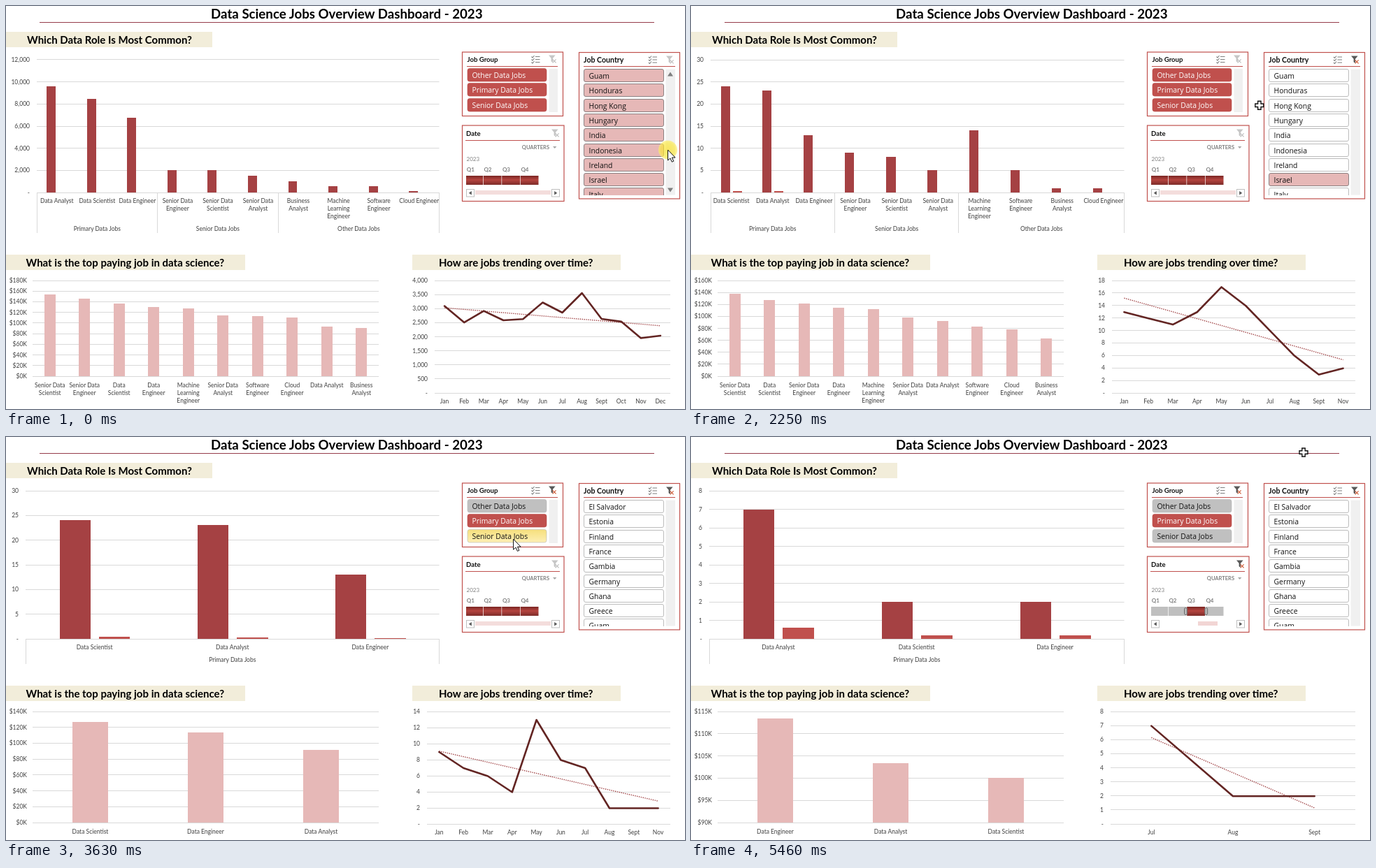
An HTML page that plays this animation: 971 by 577 pixels, repeating every 5.49 s.

```html
<!DOCTYPE html>
<html lang="en">
<head>
<meta charset="utf-8">
<title>Data Science Jobs Overview Dashboard</title>
<style>
  html, body { margin: 0; width: 100%; height: 100%; overflow: hidden; background: #fff; }
  svg { display: block; width: 971px; height: 577px; }
  text { font-family: Lato, "Open Sans", sans-serif; font-size: 8.5px; fill: #404040; }
  .title { font-size: 18.7px; font-weight: 700; fill: #000; }
  .head { font-size: 15px; font-weight: 700; fill: #000; }
  .cap { font-weight: 700; fill: #111; }
  .item { font-family: "Open Sans", "Noto Sans", sans-serif; font-size: 10.4px; }
  .soft { font-size: 8px; fill: #808080; }
  .bold { font-weight: 700; }
</style>
</head>
<body>
<svg viewBox="0 0 971 577" xmlns="http://www.w3.org/2000/svg">
  <defs>
    <linearGradient id="hover" x2="0" y2="1">
      <stop offset="0" stop-color="#f6df7c"/><stop offset="1" stop-color="#fdefb4"/>
    </linearGradient>
    <linearGradient id="seg" x2="0" y2="1">
      <stop offset="0" stop-color="#7a2623"/><stop offset=".45" stop-color="#b5443f"/><stop offset="1" stop-color="#7d2c29"/>
    </linearGradient>
    <radialGradient id="glow">
      <stop offset="0" stop-color="#fbe020"/><stop offset=".75" stop-color="#fbe83c"/><stop offset="1" stop-color="#fcee70"/>
    </radialGradient>
    <clipPath id="list"><rect x="820" y="88" width="140" height="183"/></clipPath>
  </defs>
  <rect width="971" height="577" fill="#fff"/>
  <g id="frame"></g>
  <g id="charts"></g>
  <g id="panels"></g>
  <circle id="halo" r="13.5" fill="url(#glow)"/>
  <path id="arrow" d="M0 0V15L3.4 11.9L5.8 17.2L8.2 16.2L5.9 11H10.6Z" fill="#fff" stroke="#111" stroke-width="1"/>
  <path id="cross" d="M-2.2 -6H2.2V-2.2H6V2.2H2.2V6H-2.2V2.2H-6V-2.2H-2.2Z" fill="#fff" stroke="#111" stroke-width="1.4"/>
</svg>
<script>
const LOOP = 5490;
const $ = id => document.getElementById(id);

// SVG helpers
const rect = (x, y, w, h, fill, more = '') =>
  `<rect x="${x}" y="${y}" width="${w}" height="${h}" fill="${fill}" ${more}/>`;
const text = (x, y, s, cls = '', anchor = 'start', more = '') =>
  `<text x="${x}" y="${y}" class="${cls}" text-anchor="${anchor}" ${more}>${s}</text>`;
const path = (d, stroke, w = 1, more = '') =>
  `<path d="${d}" fill="none" stroke="${stroke}" stroke-width="${w}" ${more}/>`;
const snap = v => Math.round(v) + .5;
const lines = (x, y, s) => s.split('/').map((p, i) => text(x, y + i * 11, p, '', 'middle')).join('');

// Bar on whole pixels
function bar(x, w, top, base, fill) {
  const l = Math.round(x), t = Math.round(top);
  return rect(l, t, Math.round(x + w) - l, base - t, fill);
}

// Role names, "/" marks a line break
const ROLE = {
  da: 'Data Analyst', ds: 'Data Scientist', de: 'Data Engineer',
  ds2: 'Data/Scientist', de2: 'Data/Engineer',
  sda: 'Senior Data/Analyst', sds: 'Senior Data/Scientist', sde: 'Senior Data/Engineer',
  ba: 'Business/Analyst', ml: 'Machine/Learning/Engineer', sw: 'Software/Engineer',
  ce: 'Cloud Engineer', ce2: 'Cloud/Engineer'
};
const names = s => s.split(' ').map(k => ROLE[k]);
const ALL_GROUPS = [['Primary Data Jobs', 3], ['Senior Data Jobs', 3], ['Other Data Jobs', 4]];
const ONE_GROUP = [['Primary Data Jobs', 3]];
const MONTHS = 'Jan Feb Mar Apr May Jun Jul Aug Sept Oct Nov Dec'.split(' ');
const NO_OCT = MONTHS.filter((m, i) => i < 9 || i === 10);

const STATES = [
  {
    roles: { left: 44, base: 267, max: 12000, step: 2000, groups: ALL_GROUPS,
      cats: names('da ds de sde sds sda ba ml sw ce'),
      a: [9600, 8460, 6780, 2000, 2000, 1500, 1000, 600, 600, 100], b: [] },
    pay: { base: 530, min: 0, max: 180, step: 20, cats: names('sds sde ds2 de2 ml sda sw ce2 da ba'),
      v: [153.7, 145.8, 136, 130, 127, 114, 113, 110.5, 93, 90.6] },
    trend: { left: 613, max: 4000, step: 500, cats: MONTHS,
      v: [3105, 2520, 2930, 2596, 2640, 3230, 2870, 3565, 2645, 2550, 1963, 2050] }
  },
  {
    roles: { left: 28, base: 267, max: 30, step: 5, groups: ALL_GROUPS,
      cats: names('ds da de sde sds sda ml sw ba ce'),
      a: [24, 23, 13, 9, 8, 5, 14, 5, 1, 1], b: [.25, .25] },
    pay: { base: 530, min: 0, max: 160, step: 20, cats: names('sds ds2 sde de2 ml sda da sw ce2 ba'),
      v: [137.8, 127.3, 121, 114, 111.7, 98, 92.2, 83, 78.8, 63] },
    trend: { left: 602, max: 18, step: 2, cats: NO_OCT, v: [13, 12, 11, 13, 17, 14, 10, 6, 3, 4] }
  },
  {
    roles: { left: 28, base: 289, max: 30, step: 5, groups: ONE_GROUP, cats: names('ds da de'),
      a: [24, 23, 13], b: [.42, .3, .2] },
    pay: { base: 552, min: 0, max: 140, step: 20, cats: names('ds de da'), v: [127, 113.7, 92] },
    trend: { left: 602, max: 14, step: 2, cats: NO_OCT, v: [9, 7, 6, 4, 13, 8, 7, 2, 2, 2] }
  },
  {
    roles: { left: 26, base: 289, max: 8, step: 1, groups: ONE_GROUP, cats: names('da ds de'),
      a: [7, 2, 2], b: [.6, .18, .18] },
    pay: { base: 552, min: 90, max: 115, step: 5, cats: names('de da ds'), v: [113.4, 103.4, 100] },
    trend: { left: 600, max: 8, step: 1, cats: MONTHS.slice(6, 9), v: [7, 2, 2] }
  }
];

function grid(left, right, labelX, min, max, step, yOf, fmt) {
  let out = '';
  for (let v = min; v <= max; v += step) {
    out += path(`M${left} ${snap(yOf(v) - .5)}H${right}`, '#d9d9d9') + text(labelX, yOf(v) + 3, fmt(v), '', 'end');
  }
  return out;
}
const count = v => v ? v.toLocaleString('en-US') : '-';

function rolesChart({ left, base, max, step, groups, cats, a, b }) {
  const w = (619.5 - left) / cats.length, k = (base - 77) / max;
  let out = grid(left, 619.5, left - 10, 0, max, step, v => base - v * k, count);
  cats.forEach((c, i) => {
    const x = left + i * w;
    out += bar(x + w * .247, w * .225, base - a[i] * k, base, '#a54143');
    if (b[i]) out += bar(x + w * .533, w * .225, base - b[i] * k, base, '#c0504d');
    out += lines(x + w / 2, base + 15, c);
  });
  let x = left;
  for (const [name, n] of groups) {
    out += path(`M${snap(x - .5)} ${base}V325`, '#d9d9d9') + text(x + n * w / 2, 322, name, '', 'middle');
    x += n * w;
  }
  return out + path(`M619.5 ${base}V325`, '#d9d9d9');
}

function payChart({ base, min, max, step, cats, v }) {
  const w = 495 / cats.length, k = (base - 393) / (max - min);
  const yOf = n => base - (n - min) * k;
  return grid(38, 533, 30, min, max, step, yOf, n => `$${n}K`) + cats.map((c, i) => {
    const mid = 38 + (i + .5) * w;
    return bar(mid - w * .157, w * .314, yOf(v[i]), base, '#e6b8b7') + lines(mid, base + 15.5, c);
  }).join('');
}

function trendChart({ left, max, step, cats, v }) {
  const n = v.length, w = (950 - left) / n;
  const yOf = q => 554 - q * 161 / max, lineY = q => yOf(q) + .5;
  const xOf = i => left + (i + .5) * w;
  const mid = (n - 1) / 2, mean = v.reduce((s, q) => s + q, 0) / n;
  let num = 0, den = 0;
  v.forEach((q, i) => { num += (i - mid) * q; den += (i - mid) ** 2; });
  const rise = num / den * mid;
  return grid(left, 950, left - 10, 0, max, step, yOf, count)
    + cats.map((c, i) => text(xOf(i), 569, c, '', 'middle')).join('')
    + path(`M${xOf(0)} ${lineY(mean - rise)}L${xOf(n - 1)} ${lineY(mean + rise)}`, '#a04345', 1.4, 'stroke-dasharray="1.4 1.5"')
    + path('M' + v.map((q, i) => `${xOf(i)} ${lineY(q)}`).join('L'), '#632523', 2.6, 'stroke-linejoin="round" stroke-linecap="round"');
}

const chartSets = STATES.map(s => rolesChart(s.roles) + payChart(s.pay) + trendChart(s.trend));

// Slicers
const COUNTRIES = [
  'Guam,Honduras,Hong Kong,Hungary,India,Indonesia,Ireland,Israel,Italy',
  'El Salvador,Estonia,Finland,France,Gambia,Germany,Ghana,Greece,Guam'
].map(s => s.split(','));
const GROUPS = ['Other Data Jobs', 'Primary Data Jobs', 'Senior Data Jobs'];
const PANELS = [[652.5, 66, 144, 91.5], [652.5, 171, 145.5, 108.5], [819.5, 66.5, 144, 209.5]];
const rowY = i => snap(90 + i * 21.3);

function funnel(x, y, on) {
  const c = on ? '#595959' : '#c6c6c6', xc = on ? '#d0623f' : '#c0c0c0';
  return `<path d="M${x - 5} ${y - 5.5}h9.6l-3.6 4.3v6l-2.4 -1.6v-4.4z" fill="${c}"/>`
    + path(`M${x + .6} ${y + .4}l5 5m0 -5l-5 5`, xc, 1.3);
}
function checks(x, y) {
  let d = '';
  for (let i = 0; i < 3; i++) d += `M${x} ${y + i * 4}l1.5 1.5l2.5 -3M${x + 5.5} ${y + i * 4}h6.5`;
  return path(d, '#7f7f7f', 1.1);
}
const frameOf = i => {
  const [x, y, w, h] = PANELS[i];
  return rect(x, y, w, h, '#fff', 'stroke="#c0504d" stroke-width="1.2"');
};

function groupPanel(s) {
  let out = frameOf(0) + text(659.5, 80, 'Job Group', 'cap', 'start', 'style="font-size:9.6px"')
    + path('M659 86.5H789', '#c0504d') + checks(751.5, 72.5) + funnel(781, 76, s.groupOn)
    + rect(776.5, 90, 12.5, 62, '#f0f0f0');
  GROUPS.forEach((g, i) => {
    const picked = !s.picked || i === 1, hot = s.groupHot === i;
    const fill = hot ? 'url(#hover)' : picked ? '#c0504d' : '#c0c0c0';
    out += rect(660, rowY(i) - 1, 113, 18.5, fill, `rx="3" stroke="${picked ? '#b94a47' : '#b8b8b8'}" stroke-width=".6"`)
      + text(666.5, rowY(i) + 12, g, 'item', 'start', `style="fill:${picked && !hot ? '#fff' : '#111'}"`);
  });
  return out;
}

function datePanel(s) {
  let out = frameOf(1) + text(658, 185.5, 'Date', 'cap', 'start', 'style="font-size:9.6px"')
    + path('M657 192.5H792', '#c0504d', 1.2) + funnel(785, 182, s.quarter)
    + text(777, 205, 'QUARTERS', 'soft bold', 'end', 'style="font-size:7.5px"')
    + '<path d="M782 201h5.4l-2.7 3z" fill="#a6a6a6"/>' + text(658.5, 222, '2023', 'soft');
  [658, 682.7, 709.2, 735.7].forEach((x, i) => {
    const on = !s.quarter || i === 2;
    out += text(x + .7, 237, 'Q' + (i + 1), 'soft bold') + rect(x, 243, i ? 25.8 : 24, 13, on ? 'url(#seg)' : '#bfbfbf');
  });
  if (s.quarter) for (const x of [705.5, 734.7])
    out += rect(x, 244.5, 4, 10, '#a6a6a6', 'rx="2" stroke="#666" stroke-width=".8"') + path(`M${x + 2} 246v7`, '#eee', 1, 'stroke-dasharray="1 1"');
  for (const [x, d] of [[658.5, 'l4 -2.8v5.6z'], [780.5, 'l-4 -2.8v5.6z']])
    out += rect(x, 262.5, 11, 10.5, '#fff', 'stroke="#bfbfbf"') + `<path d="M${x < 700 ? 661.8 : 788.2} 267.7${d}" fill="#555"/>`;
  return out + (s.quarter ? rect(725, 264, 28, 6, '#f2d5d4') : rect(671, 264, 108, 6, '#f4dddc'));
}

function countryPanel(s) {
  let out = frameOf(2) + text(826, 80.5, 'Job Country', 'cap', 'start', 'style="font-size:10.6px"')
    + path('M826 86.5H957', '#c0504d') + checks(919, 73) + funnel(949, 77, s.countryOn)
    + rect(943.5, 90.5, 13.5, 180, '#f0f0f0');
  if (s.arrows) out += '<path d="M946 100.5l4 -6l4 6zM946 260.5l4 6l4 -6z" fill="#7f7f7f"/>';
  out += '<g clip-path="url(#list)">';
  COUNTRIES[s.list].forEach((c, i) => {
    const picked = !s.filtered || c === 'Israel', hot = s.countryHot === i;
    const fill = hot ? 'url(#hover)' : picked ? '#e6b8b7' : '#fff';
    out += rect(826.5, rowY(i), 114, 18, fill, `rx="2.5" stroke="${picked || hot ? '#8c8283' : '#bcbcbc'}"`)
      + text(833.5, rowY(i) + 13.2, c, 'item', 'start', 'style="fill:#111"');
  });
  return out + '</g>';
}

// Pointer route: time, x, y; equal neighbours mean a rest
const ROUTE = [
  [0, 946.5, 206], [30, 946.5, 206], [330, 885.5, 247], [1920, 885.5, 247], [2250, 813, 142.5],
  [2450, 791, 121], [2500, 791, 121], [2860, 744.5, 121], [3470, 744.5, 121], [4010, 656, 239],
  [4040, 656, 239], [4250, 725.5, 246], [4960, 725.5, 246], [5220, 838, 148], [5460, 876, 22], [LOOP, 876, 22]
];
function slope(i, c) {
  const a = ROUTE[i - 1], p = ROUTE[i], b = ROUTE[i + 1];
  if (!a || !b || a[1] === p[1] || b[1] === p[1]) return 0;
  return (b[c] - a[c]) / (b[0] - a[0]);
}
function pointer(t) {
  let i = 0;
  while (i < ROUTE.length - 2 && t >= ROUTE[i + 1][0]) i++;
  const p = ROUTE[i], q = ROUTE[i + 1], d = q[0] - p[0], u = (t - p[0]) / d;
  return [1, 2].map(c => {
    const h = u * u * (3 - 2 * u);
    return p[c] + (q[c] - p[c]) * h
      + d * (slope(i, c) * u * (1 - u) ** 2 - slope(i + 1, c) * u * u * (1 - u));
  });
}

// Mouse press glow: start, hold end, fade end
const PRESSES = [[-1, 30, 110], [770, 860, 960], [2880, 2960, 3060], [4240, 4460, 4520]];
function glow(t) {
  for (const [a, b, c] of PRESSES) if (t >= a && t < c) return t < b ? 1 : (c - t) / (c - b);
  return 0;
}

const inside = (x, y, [l, top, w, h]) => x >= l && x <= l + w && y >= top && y <= top + h;
function hotRow(x, y, left, right, rows) {
  if (x < left || x > right) return -1;
  const i = Math.floor((y - 90.5) / 21.3);
  return i >= 0 && i < rows && y < rowY(i) + 18.5 && y < 271 ? i : -1;
}

$('frame').innerHTML = text(487.3, 18, 'Data Science Jobs Overview Dashboard - 2023', 'title', 'middle')
  + path('M48 23.5H927', '#963c4a')
  + rect(0, 37, 295, 22, '#f2edda') + text(30, 53.5, 'Which Data Role Is Most Common?', 'head')
  + rect(0, 356, 342, 22, '#f2edda') + text(28.5, 372.5, 'What is the top paying job in data science?', 'head')
  + rect(581, 356, 298, 22, '#f2edda') + text(619, 372.5, 'How are jobs trending over time?', 'head');

let shownCharts = -1, shownPanels = '';
function draw(t) {
  const set = t < 1080 ? 0 : t < 3210 ? 1 : t < 4700 ? 2 : 3;
  if (set !== shownCharts) $('charts').innerHTML = chartSets[shownCharts = set];

  const [x, y] = pointer(t);
  const settled = t >= 2980 && t < 3490;
  const s = {
    filtered: t >= 890, countryOn: t >= 1080, list: t >= 3120 ? 1 : 0,
    picked: t >= 2980, groupOn: t >= 3120, quarter: t >= 4320, arrows: x > 943 && x < 960,
    groupHot: settled ? -1 : hotRow(x, y, 660, 773, 3),
    countryHot: hotRow(x, y, 827, 941, 9)
  };
  const key = JSON.stringify(s);
  if (key !== shownPanels) {
    shownPanels = key;
    $('panels').innerHTML = groupPanel(s) + datePanel(s) + countryPanel(s);
  }

  const at = `translate(${x.toFixed(2)} ${y.toFixed(2)})`;
  const onPanel = PANELS.some(p => inside(x, y, p));
  for (const id of ['arrow', 'cross', 'halo']) $(id).setAttribute('transform', at);
  $('arrow').style.display = onPanel ? '' : 'none';
  $('cross').style.display = onPanel ? 'none' : '';
  $('halo').style.opacity = .68 * glow(t);
}

const start = performance.now();
function tick() {
  draw((performance.now() - start) % LOOP);
  requestAnimationFrame(tick);
}
draw(0);
requestAnimationFrame(tick);
</script>
</body>
</html>
```
